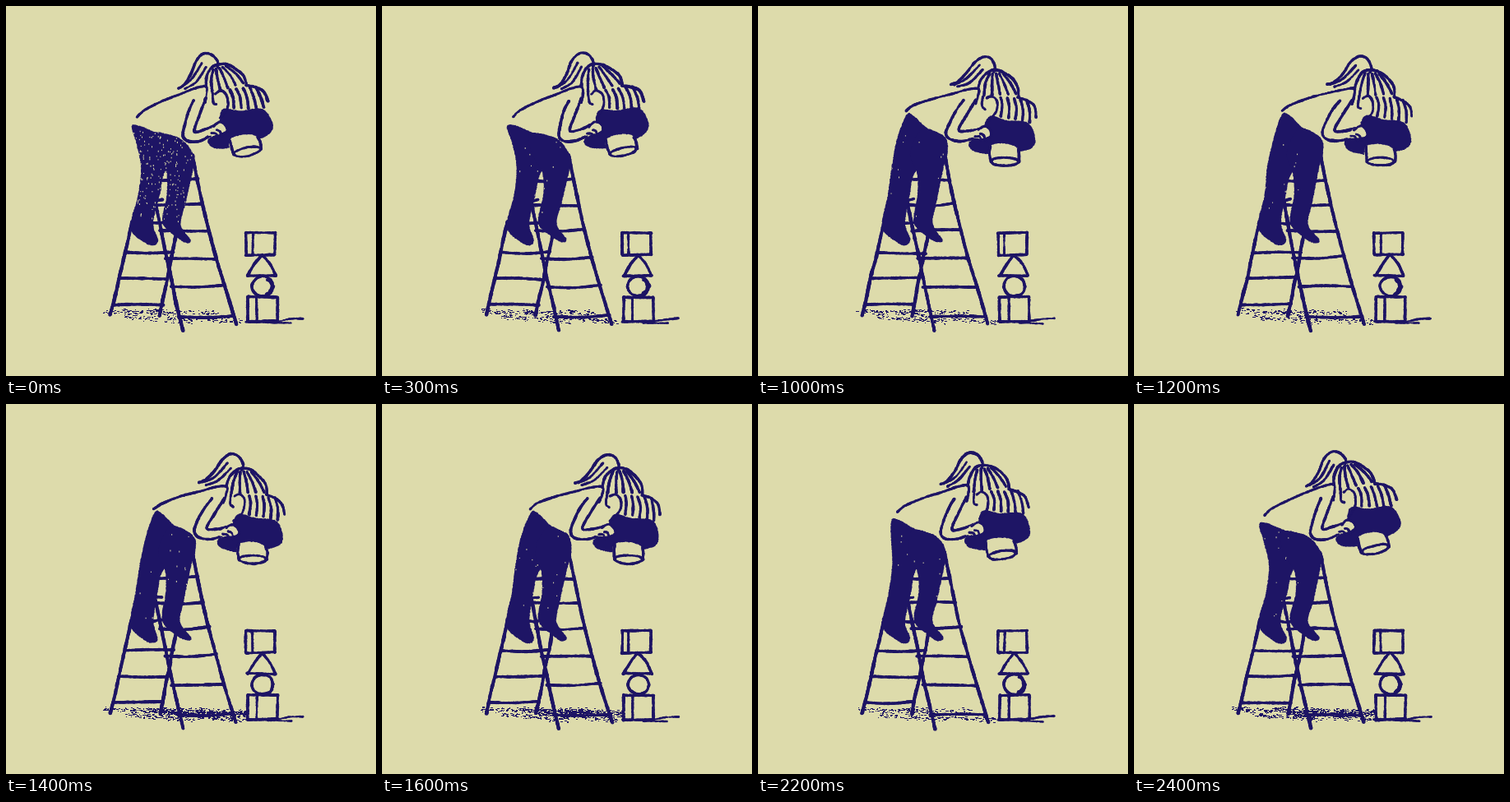
These frames come from a looping animation (450 by 450 pixels, 2.5 s). An HTML page with a canvas:

```html
<!DOCTYPE html>
<html lang="en">
<head>
<meta charset="utf-8">
<title>Ladder sketch</title>
<style>
html, body { margin: 0; width: 100%; height: 100%; overflow: hidden; background: #dddbab; }
canvas { display: block; width: 450px; height: 450px; }
</style>
</head>
<body>
<canvas id="stage" width="450" height="450"></canvas>
<script>
const ctx = document.getElementById('stage').getContext('2d');
const PAPER = '#dddbab', INK = '#1e1565';
const STEP = 100, COUNT = 25;
const NECK = [243, 98];

let seed = 1, lean = 0;

function rnd() {
  seed = (seed + 0x6D2B79F5) | 0;
  let t = Math.imul(seed ^ (seed >>> 15), 1 | seed);
  t = (t + Math.imul(t ^ (t >>> 7), 61 | t)) ^ t;
  return ((t ^ (t >>> 14)) >>> 0) / 4294967296;
}
const wob = a => (rnd() - 0.5) * 2 * a;
const mix = (a, b, t) => a + (b - a) * t;

function points(flat, shake) {
  const out = [];
  for (let i = 0; i < flat.length; i += 2) out.push([flat[i] + wob(shake), flat[i + 1] + wob(shake)]);
  return out;
}

// Catmull-Rom samples, about one per pixel
function curve(p, closed) {
  const n = p.length, out = [];
  const at = i => closed ? p[(i + n) % n] : p[Math.max(0, Math.min(n - 1, i))];
  for (let i = 0; i < (closed ? n : n - 1); i++) {
    const a = at(i - 1), b = at(i), c = at(i + 1), d = at(i + 2);
    const steps = Math.max(2, Math.ceil(Math.hypot(c[0] - b[0], c[1] - b[1])));
    for (let k = 0; k < steps; k++) {
      const t = k / steps;
      out.push([0, 1].map(j => b[j] + 0.5 * t * (c[j] - a[j] +
        t * (2 * a[j] - 5 * b[j] + 4 * c[j] - d[j] + t * (3 * (b[j] - c[j]) + d[j] - a[j])))));
    }
  }
  if (!closed) out.push(p[n - 1]);
  return out;
}

// Ink stroke stamped along a curve with an uneven radius
function line(flat, width = 3.4, closed = false) {
  ctx.fillStyle = INK;
  let r = width / 2;
  for (const [x, y] of curve(points(flat, 0.6), closed)) {
    r += wob(0.18) + (width / 2 - r) * 0.2;
    ctx.beginPath();
    ctx.arc(x + wob(0.2), y + wob(0.2), Math.max(0.7, r), 0, 7);
    ctx.fill();
  }
}

function blob(flat, color = INK) {
  const path = new Path2D();
  curve(points(flat, 0.7), true).forEach(([x, y]) => path.lineTo(x + wob(0.4), y + wob(0.4)));
  path.closePath();
  ctx.fillStyle = color;
  ctx.fill(path);
  return path;
}

function arc(x, y, rx, ry, from, to, tilt = 0) {
  const out = [], c = Math.cos(tilt), s = Math.sin(tilt);
  for (let i = 0; i <= 8; i++) {
    const a = mix(from, to, i / 8), u = rx * Math.cos(a), v = ry * Math.sin(a);
    out.push(x + u * c - v * s, y + u * s + v * c);
  }
  return out;
}

// Turns a body part about the neck while the neck travels forward
function pivot(degrees, paint) {
  ctx.save();
  ctx.translate(NECK[0] + 25 * lean, NECK[1] + 3 * lean);
  ctx.rotate(degrees * lean * Math.PI / 180);
  ctx.translate(-NECK[0], -NECK[1]);
  paint();
  ctx.restore();
}

function brush(x0, y0, x1, y1, thick, dense) {
  ctx.fillStyle = INK;
  for (let n = (x1 - x0) * dense; n > 0; n--) {
    const t = rnd(), y = mix(y0, y1, t) + (rnd() + rnd() - 1) * thick;
    ctx.fillRect(Math.round(mix(x0, x1, t)), Math.round(y), 1 + Math.floor(rnd() * 3), 1);
  }
}

function ground(heavy) {
  for (let k = 0; k < 4; k++) {
    const x = 118 + 26 * k, y = 371 + 6 * (k % 2);
    brush(x, y, x + 78 + 5 * k, y + 2 + 5 * (k % 2), 4, heavy ? 1.3 : 1);
  }
  if (heavy) brush(188, 375, 294, 376, 5, 4);
}

function rail(x0, y0, x1, y1, bow = 0) {
  const at = y => {
    const t = (y - y0) / (y1 - y0);
    return mix(x0, x1, t) + bow * Math.sin(Math.PI * t);
  };
  const flat = [];
  for (let i = 0; i <= 5; i++) {
    const y = mix(y0, y1, i / 5);
    flat.push(at(y), y);
  }
  line(flat, 4.1);
  return at;
}

function rung(x0, x1, y, tilt) {
  line([x0, y, (x0 + x1) / 2, y + wob(1), x1, y + tilt], 3.6);
}

function ladder() {
  const left = rail(153, 262, 127, 376);
  const right = rail(227, 181, 280, 387, -4);
  const front = rail(182, 238, 215, 395, -1);
  const back = rail(207, 279, 187, 377);
  for (let i = 0; i < 6; i++) {
    const y = 212 + 29 * i + 0.85 * i * i;
    rung(front(y) - 2, right(y), y, wob(2) - 1);
  }
  for (let i = 0; i < 3; i++) {
    const y = 300 + 31.5 * i;
    rung(left(y), back(y) + 1, y, wob(2));
  }
  for (const y of [236, 264]) rung(front(y) - 8, front(y) + 8, y, -1);
}

function box(x, y, w, h, inner) {
  const r = x + w, b = y + h;
  line([x, y, r, y]);
  line([r, y, r, b]);
  line([r, b, x, b + 1]);
  line([x, b, x, y]);
  line([x + inner, y + 1, x + inner, b], 3);
}

function toys() {
  box(292, 276, 35, 26, 8);
  line([311, 303, 302, 314, 294, 328]);
  line([312, 303, 321, 314, 328, 328]);
  line([293, 328, 328, 328]);
  line(arc(312, 341, 13, 12, 0, 2 * Math.PI));
  if (rnd() < 0.7) line(arc(310, 341, 13, 11, -0.9, 1), 3.6);
  box(294, 354, 36, 29, 11);
  line([292, 384, 325, 384, 345, 381, 361, 380], 2.6);
  line([318, 385, 347, 386], 2.4);
}

// Hips swing forward and up, fading out towards the knees
function leg(flat) {
  const push = lean ** 1.5, out = [];
  for (let i = 0; i < flat.length; i += 2) {
    const x = flat[i], y = flat[i + 1];
    const w = push * Math.min(1, Math.max(0, 1 - (y - 147) / 45)) ** 1.5;
    out.push(x + 28 * w - 2 * push * (y > 190 && y < 250), y - 14 * w * (214 - x) / 60);
  }
  return blob(out);
}

function legs(dry) {
  const both = leg([152, 147, 161, 145, 184, 154, 212, 162, 205, 182, 192, 205, 187, 228, 179, 264,
    185, 284, 180, 291, 168, 287, 151, 269, 160, 230, 164, 196, 158, 167]);
  both.addPath(leg([180, 155, 211, 161, 226, 178, 228, 194, 219, 238, 212, 265,
    225, 284, 219, 288, 207, 281, 190, 264, 196, 230, 195, 203, 182, 180]));
  ctx.save();
  ctx.clip(both);
  ctx.fillStyle = PAPER;
  for (let n = dry ? 230 : 16; n > 0; n--) ctx.fillRect(152 + rnd() * 80, 150 + rnd() * 112, 1, 1 + rnd());
  ctx.restore();
}

function camera() {
  blob([263, 127, 285, 127, 312, 125, 324, 144, 317, 157, 290, 168, 272, 173, 252, 172, 246, 163, 258, 152]);
  blob([272, 163, 290, 156, 306, 159, 310, 173, 293, 183, 277, 182], PAPER);
  line([272, 163, 274, 172, 277, 181]);
  line([306, 159, 309, 166, 310, 173]);
  line(arc(293.5, 177, 17, 5, 0, 2 * Math.PI, -0.22), 3);
}

function arm() {
  line([228, 115, 222, 127, 217, 144, 215, 158, 222, 165, 236, 164, 249, 158]);
  line([243, 112, 235, 132, 229, 152, 241, 150, 254, 145]);
  blob([245, 157, 249, 149, 257, 142, 266, 144, 268, 151, 257, 156], PAPER);
  line([252, 147, 259, 141, 266, 144, 269, 151, 265, 155], 2.8);
  for (let i = 0; i < 2; i++) line([256 - 6 * i, 151 + 4 * i, 260 - 5 * i, 152 + 3 * i, 263 - 5 * i, 158 + i], 2.8);
}

function hair() {
  // Ponytail
  line([209, 100, 217, 95, 225, 82, 231, 67, 240, 58, 250, 59, 257, 67, 257, 74]);
  for (let i = 0; i < 2; i++) line([213 + 5 * i, 99 + 2 * i, 226 + 5 * i, 89 + 3 * i, 238 + 5 * i, 69 + 5 * i], 2.9);
  // Crown
  line([243, 98, 244, 86, 249, 76, 257, 71, 268, 71, 280, 77, 289, 85, 293, 97]);
  line([292, 97, 304, 99, 314, 104, 319, 116]);
  // Two tiers of strands fanning out
  for (let i = 0; i < 5; i++) {
    line([252 + 4 * i, 77 - i, 250 + 7.5 * i, 89 - 1.5 * i, 251 + 9.5 * i, 104 - 2.5 * i]);
    line([272 + 8 * i, 102 - i, 276 + 8.5 * i, 111, 277 + 9 * i, 124]);
  }
}

function head() {
  hair();
  line([255, 107, 261, 103, 268, 108, 270, 119, 267, 128, 261, 136], 2.9);
  line([251, 106, 252, 117, 256, 120], 2.9);
}

function shirt() {
  line([159, 135, 168, 127, 190, 116, 212, 107, 230, 100, 243, 98, 244, 107, 242, 117], 3);
}

function ease(t) {
  t = Math.max(0, Math.min(1, t));
  return t * t * (3 - 2 * t);
}

function draw(frame) {
  seed = 977 + frame * 7919;
  lean = ease((frame - 4) / 6) - ease((frame - 20) / 4);
  ctx.fillStyle = PAPER;
  ctx.fillRect(0, 0, 450, 450);
  ground(frame % 9 > 4);
  ladder();
  toys();
  legs(frame === 0);
  pivot(12.5, camera);
  pivot(7, shirt);
  pivot(11, arm);
  pivot(12.5, head);
}

let shown = -1;
const start = performance.now();
function tick() {
  const frame = Math.floor((performance.now() - start) / STEP) % COUNT;
  if (frame !== shown) draw(shown = frame);
  requestAnimationFrame(tick);
}
tick();
</script>
</body>
</html>
```
